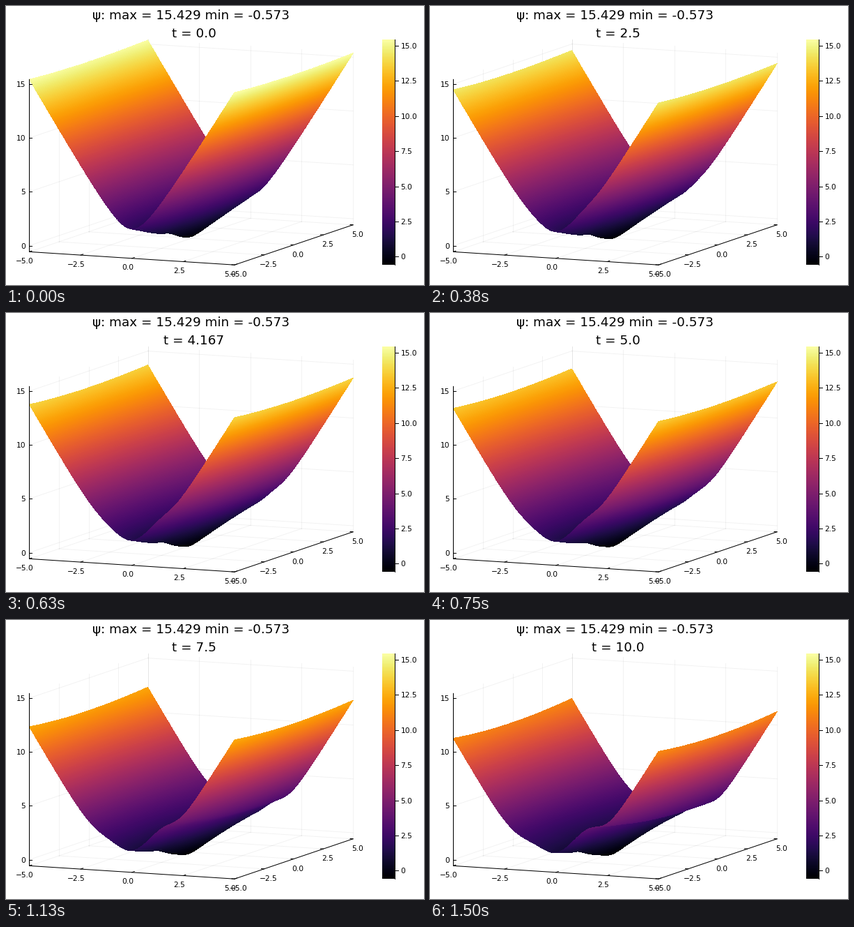
A matplotlib script for the animation above (1.62 s loop, 600 by 400 pixels).

```python
import numpy as np
import matplotlib
import matplotlib.pyplot as plt
from matplotlib.animation import FuncAnimation

W, H, DPI = 600, 400, 100
Z_MIN, Z_MAX = -0.573, 15.429
TICK_MS, HOLD_MS, LOOP_MS = 10, 125, 1620
STATES = LOOP_MS // HOLD_MS + 1
TIMES = np.linspace(0, 10, STATES)
TICKS = np.linspace(-5, 5, 5)
INFERNO = matplotlib.colormaps["inferno"]

plt.rcParams["font.family"] = "DejaVu Sans"


def project(x, y, z):
    u = 33.5 + 29.45 * (x + 5) + 17 * (y + 5)
    v = 352.4 + 1.88 * (x + 5) - 5.74 * (y + 5) - 15.44 * (z - Z_MIN)
    return u, v


def step(x):
    return 1 / (1 + np.exp(-x))


def height(x, y, t):
    """A stretched cone whose two walls sink while a kink moves outwards."""
    far = y * y / 25
    sunk = t * t / (t + .25)
    yc = y + .03 * t
    cone = np.sqrt((3.16 * x) ** 2 + ((.5 - .01 * y) * yc) ** 2 + .04) - .6

    right = (1.5 + .05 * t) * (1 - .025 * (y + 5))
    left = 1.1 + .035 * t
    walls = step((x - right) / .35) + step((-x - left) / .5)
    drop = sunk * (.055 * far + (.445 - .075 * far) * walls)

    ridge = .2 * np.exp(-((y + 1.8 + .12 * t) / .7) ** 2) / (1 + x * x)
    return cone - drop + ridge


def render(t):
    """Paint the surface from far to near into a transparent picture."""
    x = np.linspace(-5, 5, 1400)[None, :]
    y = np.linspace(5, -5, 560)[:, None]
    z = height(x, y, t)
    u, v = project(x, y, z)
    shade = np.clip((z - Z_MIN) / (Z_MAX - Z_MIN) * 256, 0, 255).astype(int)
    palette = INFERNO(np.arange(256), bytes=True)
    picture = np.zeros((H, W, 4), np.uint8)
    row = np.clip(v, 0, H - 1).astype(int)
    col = np.clip(u, 0, W - 1).astype(int)
    picture[row.ravel(), col.ravel()] = palette[shade.ravel()]
    return picture


fig = plt.figure(figsize=(W / DPI, H / DPI), dpi=DPI, facecolor="white")
ax = fig.add_axes([0, 0, 1, 1])
ax.axis("off")


def px(size):
    return size * 72 / DPI


def line(points, **style):
    style = {"color": "black", "lw": px(1), "zorder": 4, **style}
    ax.plot(*zip(*points), **style)


def grid(a, b):
    line([project(*a), project(*b)], alpha=.05, zorder=1)


def label(x, y, text, size=10.6, ha="center"):
    return ax.text(x, y, text, fontsize=px(size), ha=ha, va="baseline", zorder=5)


def decimal(value):
    return f"{value:.1f}".replace("-", "\u2212")


def draw_axes():
    for k in TICKS:
        grid((k, -5, Z_MIN), (k, 5, Z_MIN))
        grid((k, 5, Z_MIN), (k, 5, Z_MAX))
        grid((-5, k, Z_MIN), (5, k, Z_MIN))
        grid((-5, k, Z_MIN), (-5, k, Z_MAX))

        u, v = project(k, -5, Z_MIN)
        line([(u, v), (u + 3.5, v - 1.2)])
        label(u - 6.3, v + 16.6, decimal(k))
        u, v = project(5, k, Z_MIN)
        line([(u, v), (u - 4, v - .3)])
        label(u + 6.2, v + 17, decimal(k))

    for k in range(0, 16, 5):
        grid((-5, -5, k), (-5, 5, k))
        grid((-5, 5, k), (5, 5, k))
        u, v = project(-5, -5, k)
        line([(u, v), (u + 3, v)])
        label(28, v + 4, str(k), ha="right")

    corners = [(-5, -5, Z_MAX), (-5, -5, Z_MIN), (5, -5, Z_MIN), (5, 5, Z_MIN)]
    line([project(*c) for c in corners])


def draw_colorbar(left=540, right=558, top=48, bottom=371):
    ramp = np.linspace(1, 0, 256)[:, None]
    ax.imshow(ramp, cmap="inferno", vmin=0, vmax=1, aspect="auto",
              extent=(left, right, bottom, top), interpolation="nearest")
    edge = right - .5
    line([(edge, top), (edge, bottom)])
    for k in np.arange(0, 15.1, 2.5):
        v = bottom - (k - Z_MIN) / (Z_MAX - Z_MIN) * (bottom - top)
        line([(edge, v), (edge + 5, v)])
        label(566.5, v + 4, decimal(k) if k else "0", ha="left")


draw_axes()
draw_colorbar()
label(266, 19, f"\u03c8: max = {Z_MAX} min = {Z_MIN}", 18.4)
clock = label(270, 45, "", 18.4)

pictures = [render(t) for t in TIMES]
surface = ax.imshow(pictures[0], extent=(0, W, H, 0), aspect="auto",
                    interpolation="nearest", zorder=3)
ax.set_xlim(0, W)
ax.set_ylim(H, 0)


def update(i):
    k = i * TICK_MS // HOLD_MS
    surface.set_data(pictures[k])
    clock.set_text(f"t = {round(float(TIMES[k]), 3)}")
    return surface, clock


anim = FuncAnimation(fig, update, frames=LOOP_MS // TICK_MS,
                     interval=TICK_MS, repeat=True, repeat_delay=0)
plt.show()
```
